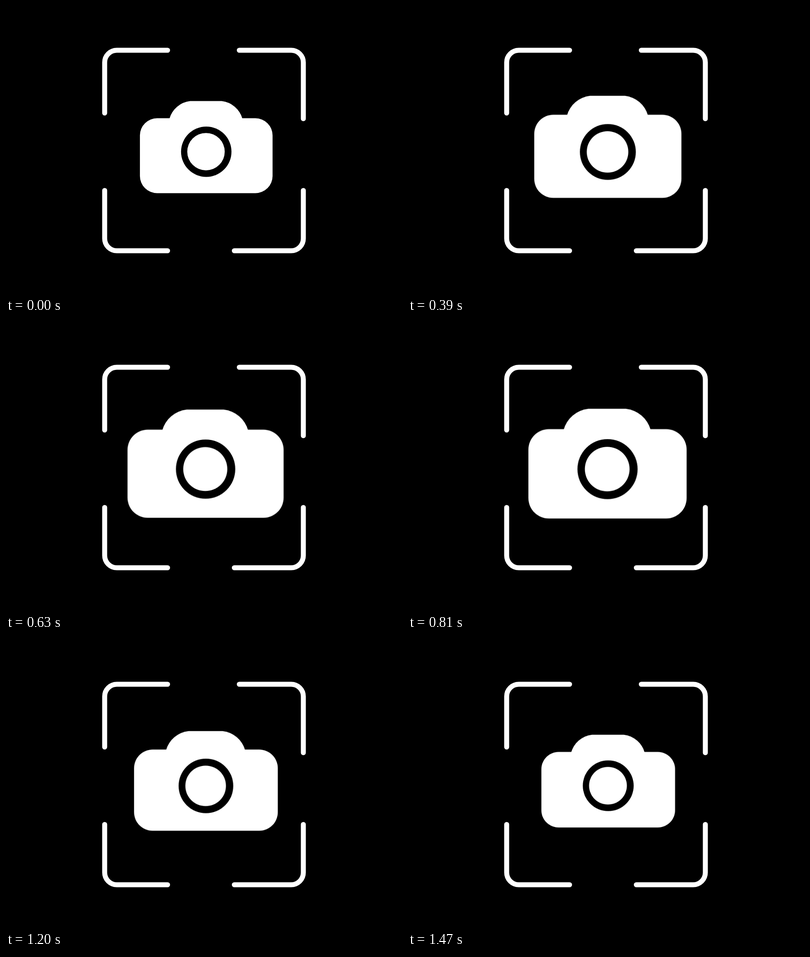
Recreate the animation shown at these times as an HTML page. Size 875 by 640 pixels, loop 1.5 s.

```html
<!DOCTYPE html>
<html lang="en">
<head>
<meta charset="utf-8">
<title>Camera focus</title>
<style>
  html, body { margin: 0; width: 100%; height: 100%; overflow: hidden; background: #000; }
  svg { display: block; width: 875px; height: 640px; }
  .brackets { fill: none; stroke: #fff; stroke-width: 11; stroke-linecap: round; }
  .camera {
    fill: #fff;
    transform-box: view-box;
    transform-origin: 451px 318px;
    animation: zoom 750ms linear infinite alternate;
  }
  .ring { fill: #000; }
  @keyframes zoom {
    from { transform: scale(1); }
    to { transform: scale(1.21); }
  }
</style>
</head>
<body>
<svg viewBox="0 0 875 640">
  <g class="brackets">
    <path d="M357 98H245a27 27 0 0 0-27 27V237"/>
    <path d="M515.5 98H630a27 27 0 0 1 27 27V249.5"/>
    <path d="M218 408.5V515a27 27 0 0 0 27 27H357"/>
    <path d="M657 408.5V515a27 27 0 0 1-27 27H504.5"/>
  </g>
  <g class="camera">
    <path d="M361 250A54 54 0 0 1 407 210.6H476.5A54 54 0 0 1 522.5 250Z"/>
    <rect x="295.9" y="248.5" width="293.1" height="165.9" rx="38"/>
    <circle class="ring" cx="442.5" cy="322.7" r="55.7"/>
    <circle cx="441.9" cy="322.6" r="41.4"/>
  </g>
</svg>
</body>
</html>
```
